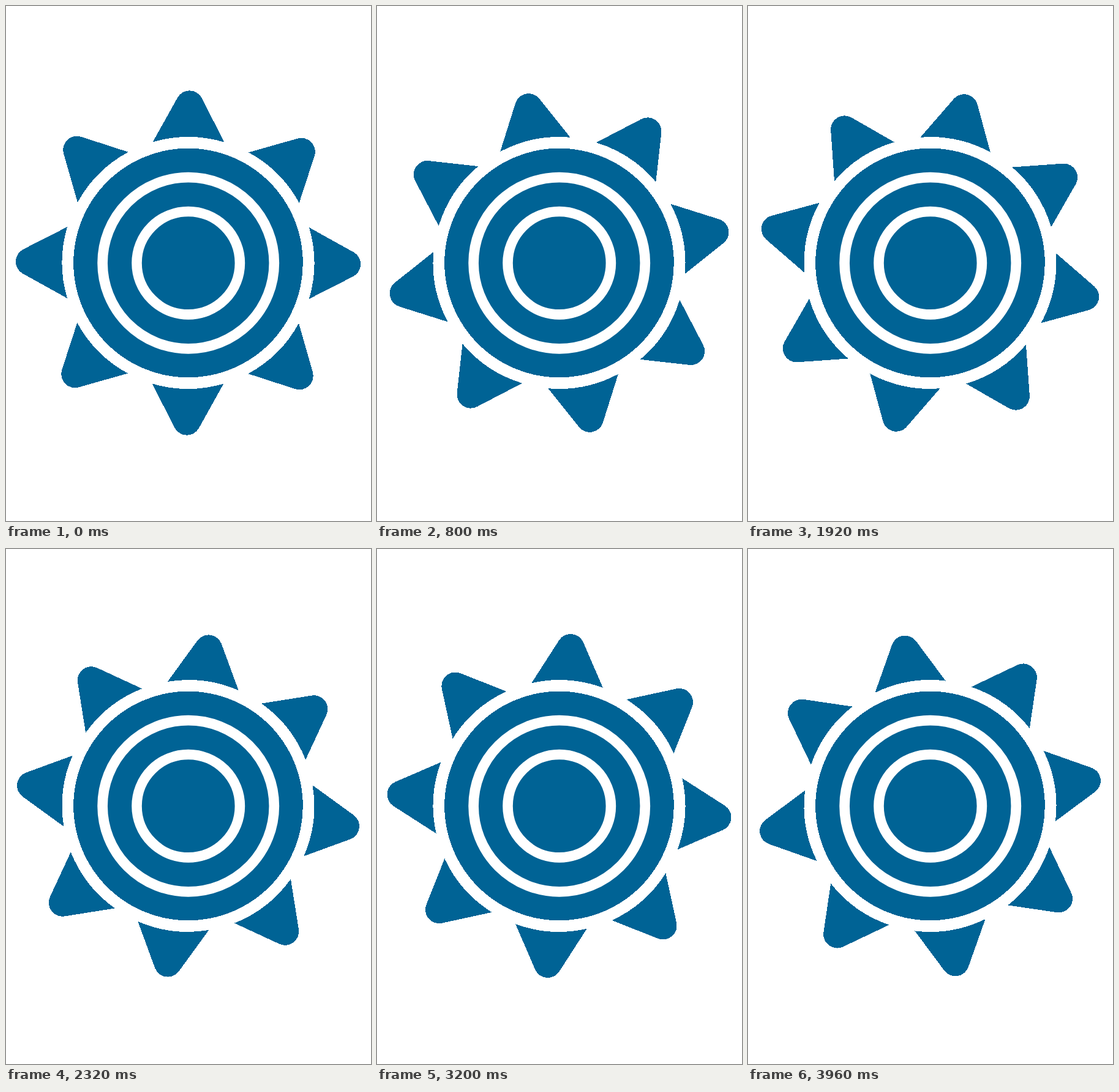
These frames come from a looping animation (596 px wide and 842 px high, 4 s). An HTML page:

```html
<!DOCTYPE html>
<html lang="en">
<head>
<meta charset="utf-8">
<title>Spinning sun</title>
<style>
  html, body { margin: 0; width: 100%; height: 100%; overflow: hidden; background: #fff; }
  svg { display: block; width: 596px; height: 842px; }
  .hard { shape-rendering: crispEdges; }
  .ring { fill: none; stroke: #fff; }
</style>
</head>
<body>
<svg viewBox="0 0 596 842" fill="#006395">
  <defs>
    <path id="ray" d="M-57.9-197.5L-17.5-270.1A22.5 22.5 0 0 1 22.2-269.4L58.9-197.4A205.7 205.7 0 0 0-57.9-197.5Z"/>
  </defs>
  <g transform="translate(297.5 420)">
    <g id="rays" class="hard"></g>
    <circle class="hard" r="187.3"/>
    <g class="ring" transform="translate(.2 .2)">
      <circle r="140.1" stroke-width="16.7"/>
      <circle r="84.2" stroke-width="16.6"/>
    </g>
  </g>
</svg>
<script>
  const STEP_MS = 40, STEPS = 100;
  const TICK_MS = 1000 / 59.94; // the turn advances in video ticks
  const DEG_PER_MS = 0.1;
  const rays = document.getElementById('rays');

  for (let i = 0; i < 8; i++) {
    const ray = document.createElementNS(rays.namespaceURI, 'use');
    ray.setAttribute('href', '#ray');
    ray.setAttribute('transform', `rotate(${i * 45})`);
    rays.append(ray);
  }

  // Each step shows the last tick completed by its start.
  function angleAt(ms) {
    const step = Math.floor(ms / STEP_MS) % STEPS;
    const ticks = Math.floor(step * STEP_MS / TICK_MS);
    return ticks * TICK_MS * DEG_PER_MS;
  }

  const start = performance.now();
  function draw() {
    rays.setAttribute('transform', `rotate(${angleAt(performance.now() - start)})`);
    requestAnimationFrame(draw);
  }
  draw();
</script>
</body>
</html>
```
